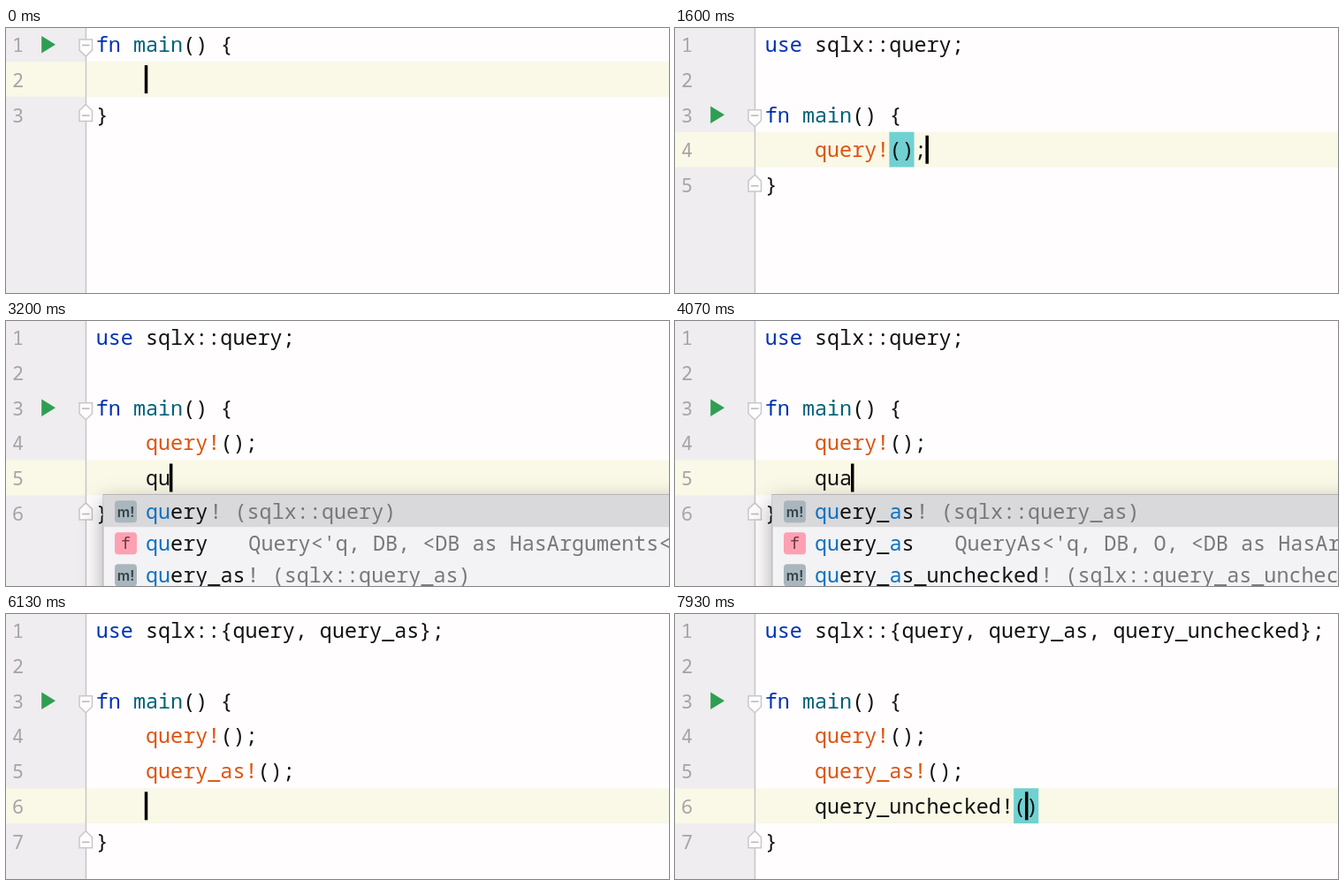
Animation, 750 px wide and 300 px high, one loop 8 s. Source, as an HTML page with a canvas:

```html
<!DOCTYPE html>
<html lang="en">
<head>
<meta charset="utf-8">
<title>Macro completion</title>
<style>
html, body { margin: 0; width: 100%; height: 100%; overflow: hidden; background: #fffdfe; }
canvas { display: block; width: 750px; height: 300px; }
</style>
</head>
<body>
<canvas id="stage" width="750" height="300"></canvas>
<script>
const ctx = document.getElementById('stage').getContext('2d');
const W = 750, H = 300, LOOP = 8000;
const MONO = '"Noto Sans Mono", "DejaVu Sans Mono", monospace';
const CODE_FONT = '23.45px ' + MONO;
const CELL = 14.07, LEFT = 101.7, ROW = 39.8, TOP = -1.7, BASE = 27;
const POPUP_X = 110, ITEM_H = 36;

const INK = '#111', KEYWORD = '#0033b3', FUNC = '#00627a', MACRO = '#dd5410';
const HINT = '#787779', MATCH = '#0b72c4';

// Completion entries: icon kind, name, indices of matched letters, grey tail
const macro = (name, ...hits) => ({ kind: 'm!', name, hits: [0, 1, ...hits], tail: `! (sqlx::${name})`, gap: 2 });
const fn = (name, tail, ...hits) => ({ kind: 'f', name, hits: [0, 1, ...hits], tail, gap: 46 });

const AS_TYPE = "QueryAs<'q, DB, O, <DB as HasArguments<'q>>::Arguments>";
const QU_LIST = [
  macro('query'),
  fn('query', "Query<'q, DB, <DB as HasArguments<'q>>::Arguments>"),
  macro('query_as'),
  macro('query_unchecked'),
  macro('query_as_unchecked')
];
const QUA_LIST = [
  macro('query_as', 6),
  fn('query_as', AS_TYPE, 6),
  macro('query_as_unchecked', 6)
];
const QUU_LIST = [macro('query_unchecked', 6), macro('query_as_unchecked', 9)];

const Q1 = 'query!();', Q2 = 'query_as!();';
const USE1 = 'use sqlx::query;';
const USE2 = 'use sqlx::{query, query_as};';
const USE3 = 'use sqlx::{query, query_as, query_unchecked};';

// Each step overrides part of the editor state from its time on
const steps = [
  [0, { use: '', body: [''], resolved: 0, back: 0, match: false, popup: null }],
  [70, { body: ['q'] }],
  [200, { body: ['qu'] }],
  [270, { popup: [] }],
  [470, { popup: QU_LIST }],
  [870, { body: ['query!()'], back: 1, match: true, popup: null }],
  [930, { use: USE1 }],
  [1130, { resolved: 1 }],
  [1400, { back: 0 }],
  [1600, { body: [Q1] }],
  [1670, { match: false }],
  [2000, { body: [Q1, ''] }],
  [2400, { body: [Q1, 'q'] }],
  [2530, { body: [Q1, 'qu'] }],
  [2600, { popup: [] }],
  [2870, { popup: QU_LIST }],
  [3470, { body: [Q1, 'qua'] }],
  [3530, { popup: QUA_LIST }],
  [4330, { body: [Q1, 'query_as!()'], back: 1, match: true, popup: null }],
  [4400, { use: USE2 }],
  [4670, { resolved: 2 }],
  [5130, { back: 0 }],
  [5530, { body: [Q1, Q2] }],
  [5600, { match: false }],
  [5930, { body: [Q1, Q2, ''] }],
  [6470, { body: [Q1, Q2, 'q'] }],
  [6600, { body: [Q1, Q2, 'qu'] }],
  [6670, { popup: [] }],
  [6800, { popup: QU_LIST }],
  [6930, { body: [Q1, Q2, 'quu'] }],
  [7000, { popup: QUU_LIST }],
  [7800, { body: [Q1, Q2, 'query_unchecked!()'], back: 1, match: true, popup: null }],
  [7870, { use: USE3 }]
];

const stateAt = t => Object.assign({}, ...steps.filter(s => s[0] <= t).map(s => s[1]));
const rowTop = row => TOP + row * ROW;
const colX = col => LEFT + col * CELL;

function rect(x, y, w, h, color) {
  ctx.fillStyle = color;
  ctx.fillRect(x, y, w, h);
}

function text(str, x, y, color) {
  ctx.fillStyle = color;
  ctx.fillText(str, x, y);
}

function code(row, col, str, color = INK) {
  text(str, colX(col), BASE + row * ROW, color);
}

function path(points) {
  ctx.beginPath();
  points.forEach(([x, y]) => ctx.lineTo(x, y));
  ctx.closePath();
}

function runIcon(row) {
  const y = 18.7 + row * ROW;
  path([[40.2, y - 9.8], [56, y], [40.2, y + 9.8]]);
  ctx.fillStyle = '#2f9e52';
  ctx.fill();
}

// dir 1 points down (fold start), -1 points up (fold end)
function foldMark(row, dir) {
  const mid = 19.5 + row * ROW, y = mid + 0.6 * dir;
  path([[83, y - 7 * dir], [97.5, y - 7 * dir], [97.5, y + 5 * dir], [90.3, y + 12 * dir], [83, y + 5 * dir]]);
  ctx.fillStyle = '#fffdfe';
  ctx.fill();
  ctx.strokeStyle = '#c8c7c9';
  ctx.lineWidth = 1.5;
  ctx.stroke();
  rect(86, mid - 0.8, 8.5, 1.6, '#bbbabc');
}

function icon(kind, y) {
  const isMacro = kind === 'm!';
  ctx.beginPath();
  ctx.roundRect(123, y - 12.5, 25, 25, 4);
  ctx.fillStyle = isMacro ? '#aab6bd' : '#fda1b2';
  ctx.fill();
  ctx.textAlign = 'center';
  ctx.font = isMacro ? '600 16px Inter, Roboto, sans-serif' : '18px ' + MONO;
  text(kind, 135.5, y + 6, isMacro ? '#35434b' : '#6b3440');
  ctx.textAlign = 'left';
  ctx.font = CODE_FONT;
}

function drawItem(item, y) {
  icon(item.kind, y);
  const x = colX(4), base = y + 8;
  [...item.name].forEach((ch, i) =>
    text(ch, x + i * CELL, base, item.hits.includes(i) ? MATCH : INK));
  text(item.tail, x + item.name.length * CELL + item.gap, base, HINT);
}

function drawPopup(items, row) {
  const y = rowTop(row + 1) - 0.8;
  const w = items.length ? W : 478;
  ctx.save();
  ctx.shadowColor = 'rgba(0,0,0,0.36)';
  ctx.shadowBlur = 24;
  ctx.shadowOffsetY = 8;
  rect(POPUP_X, y, w, H, items.length ? '#f3f2f4' : '#f0eef0');
  ctx.restore();
  ctx.strokeStyle = '#b4b3b5';
  ctx.lineWidth = 1;
  ctx.strokeRect(POPUP_X, y, w, H);
  if (items.length) rect(POPUP_X + 0.5, y + 0.7, w, ITEM_H, '#d9d8da');
  items.forEach((item, i) => drawItem(item, y + 19.3 + i * ITEM_H));
}

function draw(t) {
  const s = stateAt(t);
  const first = s.use ? 2 : 0;
  const row = first + s.body.length;
  const last = row + 1;
  const line = s.body[s.body.length - 1];

  rect(0, 0, W, H, '#fffdfe');
  rect(0, 0, 90, H, '#efedef');
  rect(0, rowTop(row), W, ROW, '#faf8e6');
  rect(89.7, 0, 1.5, H, '#c6c5c7');

  ctx.font = '21.8px ' + MONO;
  for (let i = 0; i <= last; i++) text(i + 1, 7, BASE + i * ROW, '#a5a4a6');
  ctx.font = CODE_FONT;

  runIcon(first);
  foldMark(first, 1);
  foldMark(last, -1);

  if (s.match) {
    const open = 4 + line.indexOf('(');
    rect(colX(open), rowTop(row), CELL * 2, ROW, '#70d1d1');
  }

  if (s.use) {
    code(0, 0, 'use', KEYWORD);
    code(0, 4, s.use.slice(4));
  }
  code(first, 0, 'fn', KEYWORD);
  code(first, 3, 'main', FUNC);
  code(first, 7, '() {');
  s.body.forEach((str, i) => {
    const cut = i < s.resolved ? str.indexOf('!') + 1 : 0;
    code(first + 1 + i, 4, str.slice(0, cut), MACRO);
    code(first + 1 + i, 4 + cut, str.slice(cut));
  });
  code(last, 0, '}');

  rect(colX(4 + line.length - s.back) - 1.2, rowTop(row) + 4, 3.5, 32, '#000');
  if (s.popup) drawPopup(s.popup, row);
}

function frame() {
  draw(performance.now() % LOOP);
  requestAnimationFrame(frame);
}
frame();
</script>
</body>
</html>
```
